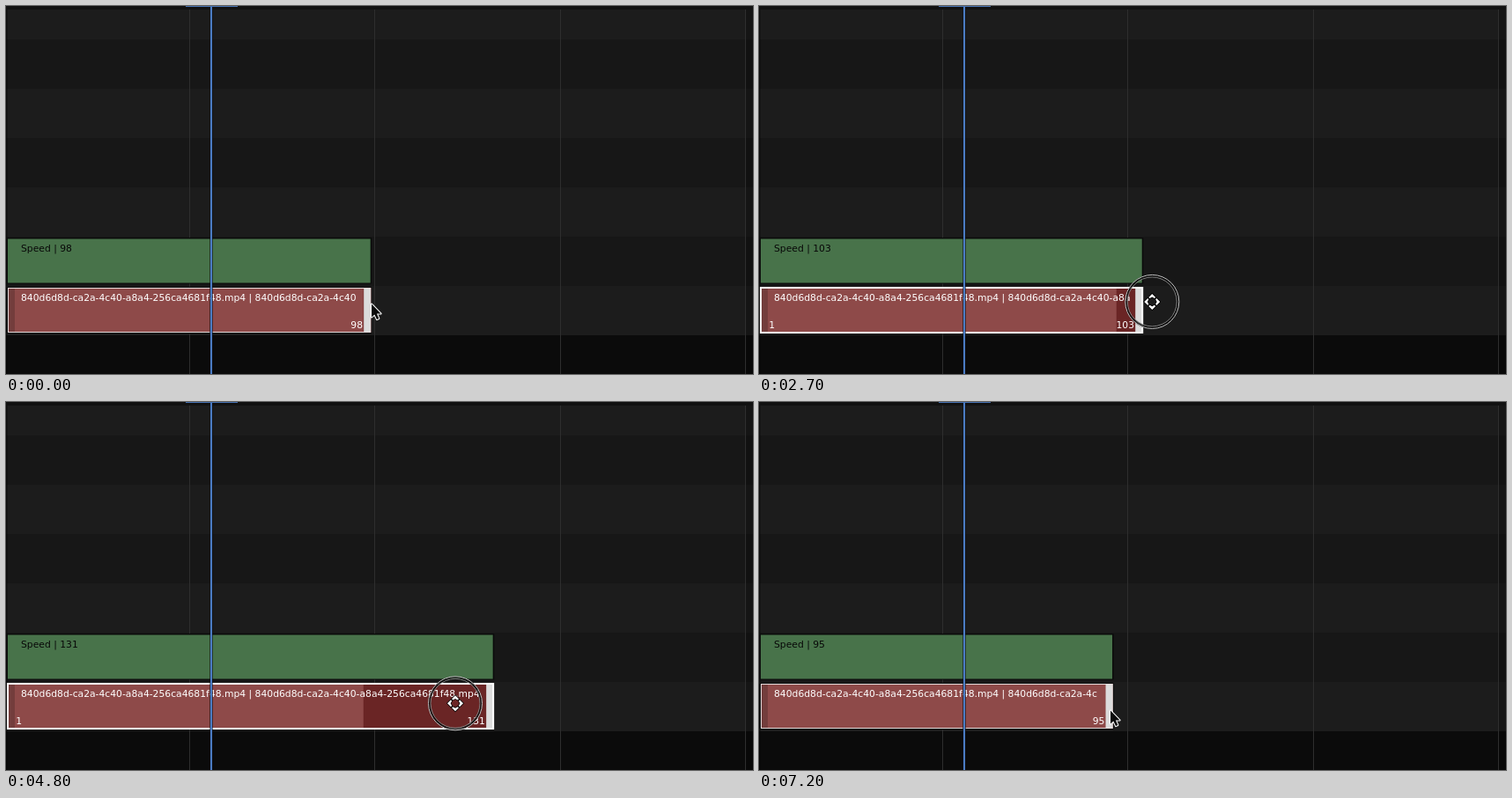
These frames come from a looping animation (848x418 px, 8 s). An HTML page with a canvas:

```html
<!DOCTYPE html>
<html lang="en">
<head>
<meta charset="utf-8">
<title>Strip trimming</title>
<style>
  html, body { margin: 0; width: 100%; height: 100%; overflow: hidden; background: #0b0b0b; }
  canvas { display: block; width: 848px; height: 418px; }
</style>
</head>
<body>
<canvas id="stage" width="848" height="418"></canvas>
<script>
const ctx = document.getElementById('stage').getContext('2d');
const LOOP = 8000, STEP = 100;
const ORIGIN = 1.4, UNIT = 4.212;      // timeline position in pixels
const FONT = '10.775px "DejaVu Sans", sans-serif';
const CLIP = '840d6d8d-ca2a-4c40-a8a4-256ca4681f48.mp4';
const PRESS = 1900, RELEASE = 7000;

// Horizontal pointer swings: time, x
const swing = [
  [0, 414], [900, 484], [PRESS, 410], [2300, 409.5], [4100, 701], [4500, 682],
  [4700, 549], [5100, 423], [5600, 309], [5800, 264], [6300, 34], [6800, 398], [LOOP, 398]
];

const rate = (a, b) => (b[1] - a[1]) / (b[0] - a[0]);

// Flat at turning points, otherwise a limited central difference
function slope(i) {
  const a = swing[i - 1], b = swing[i], c = swing[i + 1];
  if (!a || !c) return 0;
  const s1 = rate(a, b), s2 = rate(b, c);
  if (s1 * s2 <= 0) return 0;
  return Math.sign(s1) * Math.min(Math.abs(rate(a, c)), 3 * Math.abs(s1), 3 * Math.abs(s2));
}

function pointerX(t) {
  const i = Math.max(0, swing.findIndex(k => k[0] > t) - 1);
  const [t0, x0] = swing[i], [t1, x1] = swing[i + 1];
  const d = t1 - t0, u = (t - t0) / d, v = 1 - u;
  return x0 + (x1 - x0) * u * u * (3 - 2 * u) +
    d * u * v * (slope(i) * v - slope(i + 1) * u);
}

// Drifts up, then down
function pointerY(t) {
  return t < 3300 ? 340 - t / 660 : 335 + Math.min(17, (t - 3300) / 206);
}

function stripLength(t) {
  if (t <= PRESS) return 98;
  const lagged = pointerX(Math.min(t, RELEASE) - STEP);
  return Math.max(1, Math.round((lagged + 4 - ORIGIN) / UNIT));
}

function rect(x, y, w, h, color) {
  ctx.fillStyle = color;
  ctx.fillRect(x, y, w, h);
}

function text(str, x, y, color, align = 'left') {
  ctx.fillStyle = color;
  ctx.textAlign = align;
  ctx.fillText(str, x, y);
}

// Drop trailing letters until the label fits
function fit(str, width) {
  ctx.textAlign = 'left';
  while (str && ctx.measureText(str).actualBoundingBoxRight > width) str = str.slice(0, -1);
  return str;
}

function background() {
  rect(0, 0, 848, 418, '#0b0b0b');
  rect(0, 0, 848, 4, '#111');
  for (let i = 0; i < 7; i++) {
    const top = Math.max(4, 56 * i - 18);
    rect(0, top, 848, 56 * i + 38 - top, i % 2 ? '#171717' : '#1c1c1c');
  }
  rect(0, 4, 1.5, 414, 'rgba(0,0,0,.45)');
  rect(840, 4, 8, 414, 'rgba(0,0,0,.25)');
  for (let i = 0; i < 4; i++) rect(Math.round(208 + i * 210.4), 4, 1, 414, '#2e2e2e');
}

function outline(w, dragging) {
  const inset = dragging ? 0 : 0.5;
  ctx.strokeStyle = dragging ? '#fff' : '#e6dcdc';
  ctx.lineWidth = dragging ? 2 : 1;
  ctx.lineJoin = 'miter';
  ctx.strokeRect(2 + inset, 320 + inset, w - 2 * inset, 51 - 2 * inset);
}

function strips(n, dragging) {
  const end = ORIGIN + UNIT * n, w = end - 2;
  const room = end - 13.2 - 17;
  const handle = Math.min(8, w / 4);
  const hold = ORIGIN + UNIT * 96;

  rect(1, 263, w + 2, 52.5, '#0b0b0b');
  rect(2, 264.5, w - 0.5, 50, '#48734a');
  text(fit('Speed | ' + n, room), 17, 278.5, '#080808');

  rect(1, 319, w + 2, 53, '#0b0b0b');
  rect(2, 320, w, 51, '#8e4a49');
  if (end > hold) rect(hold, 320, end - hold, 51, '#6a2525');
  rect(2, 320, handle, 51, '#733d3c');
  rect(end - handle, 320, handle, 51, '#dcdcdc');
  outline(w, dragging);

  text(fit(`${CLIP} | ${CLIP} | ${n}`, room), 17, 334.5, '#fff');
  if (dragging && w > 50) text('1', 11.3, 365.5, '#fff');
  if (w > 30) text(n, end - 9.2, 365.5, '#fff', 'right');
}

function playhead() {
  rect(231, 0, 4, 418, 'rgba(15,20,30,.6)');
  rect(232, 0, 2, 418, '#4b7cc4');
  rect(204, 0, 59, 1, '#4772b3');
}

function circle(x, y, r, width, color) {
  ctx.beginPath();
  ctx.arc(x, y, r, 0, Math.PI * 2);
  ctx.lineWidth = width;
  ctx.strokeStyle = color;
  ctx.stroke();
}

function ring(x, y, r) {
  circle(x, y, r - 1.7, 3, 'rgba(0,0,0,.8)');
  circle(x, y, r - 0.5, 1, '#c4c4c4');
  circle(x, y, r - 3, 0.8, '#a0a0a0');
}

function shape(points, fill, line, width) {
  ctx.beginPath();
  points.forEach(([x, y]) => ctx.lineTo(x, y));
  ctx.closePath();
  ctx.lineJoin = 'round';
  ctx.lineWidth = width;
  ctx.strokeStyle = line;
  ctx.stroke();
  ctx.fillStyle = fill;
  ctx.fill();
}

function arrow(x, y) {
  ctx.save();
  ctx.translate(x + 1, y - 1.5);
  shape([[0, 0], [0, 15], [3.4, 12], [6, 17.6], [8.4, 16.5], [5.9, 11], [10.6, 11]],
    '#0a0a0a', '#fff', 2);
  ctx.restore();
}

function moveCursor(x, y) {
  ctx.save();
  ctx.translate(x, y);
  for (let i = 0; i < 4; i++) {
    shape([[0, -9], [4, -5], [2.6, -3.9], [0, -5.4], [-2.6, -3.9], [-4, -5]], '#fff', '#000', 1.6);
    ctx.rotate(Math.PI / 2);
  }
  ctx.restore();
}

// Grows on press, shrinks on release
function ringRadius(t) {
  if (t < PRESS || t >= RELEASE + 200) return 0;
  if (t < PRESS + STEP) return 22.5;
  return t < RELEASE ? 31 : 26 - (t - RELEASE) * 0.08;
}

function draw(now) {
  const t = Math.floor((now % LOOP) / STEP) * STEP;
  const dragging = t > PRESS && t < RELEASE;
  const x = pointerX(t), y = pointerY(t), r = ringRadius(t);
  ctx.font = FONT;
  background();
  strips(stripLength(t), dragging);
  playhead();
  if (r) ring(x, y, r);
  (dragging ? moveCursor : arrow)(x, y);
}

let start;
function tick(now) {
  start ??= now;
  draw(Math.max(0, now - start));
  requestAnimationFrame(tick);
}
draw(0);
requestAnimationFrame(tick);
</script>
</body>
</html>
```
